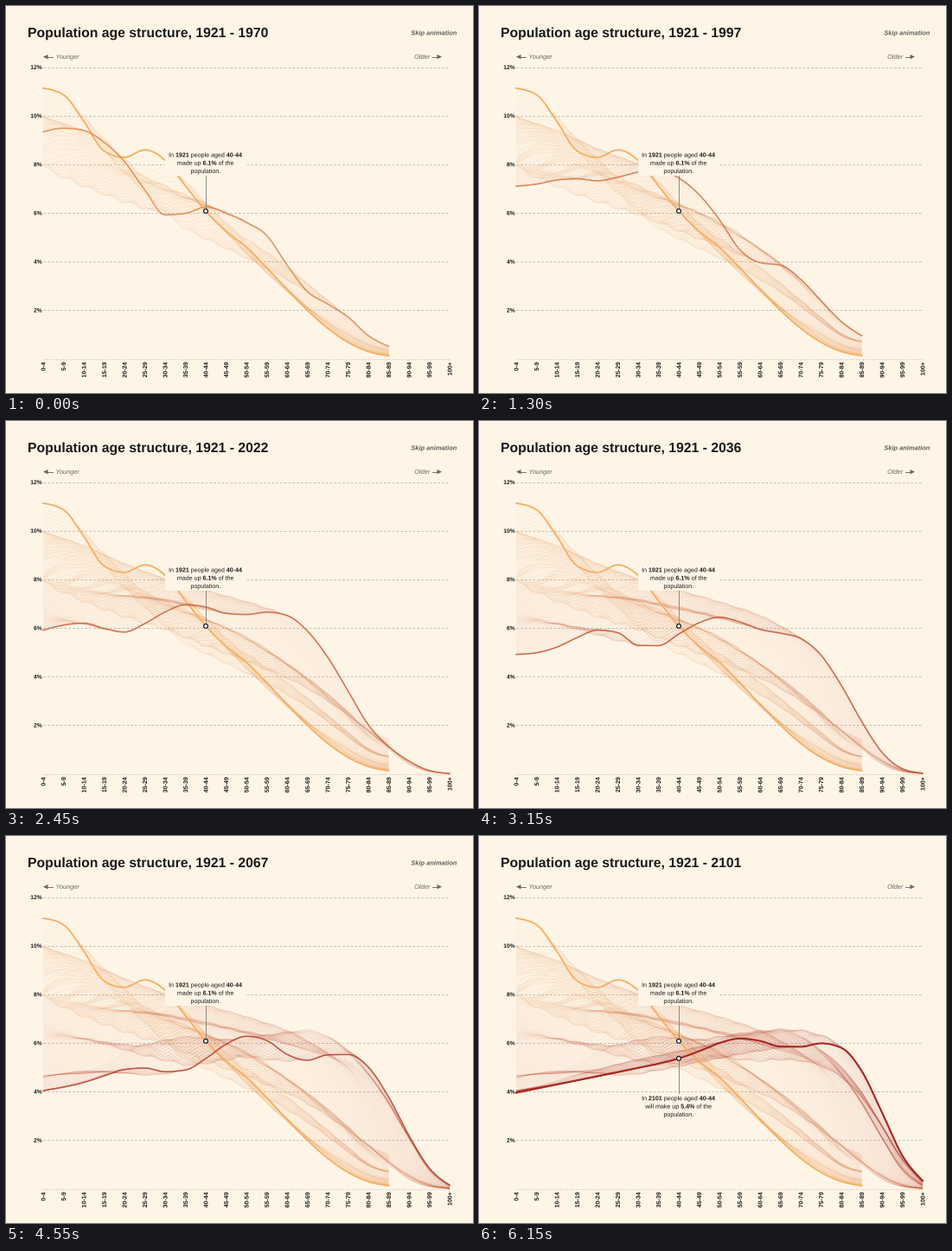
These frames come from a looping animation (540x447 px, 7.65 s). A matplotlib script:

```python
import numpy as np
import matplotlib.pyplot as plt
from matplotlib.animation import FuncAnimation
from matplotlib.collections import LineCollection
from matplotlib.patches import Circle, PathPatch, Polygon, Rectangle
from matplotlib.textpath import TextPath
from matplotlib.transforms import Affine2D

W, H, DPI = 540, 447, 72          # at 72 dpi one point is one pixel
BG, INK, GREY = "#fef5e7", "#1c1a18", "#6b6762"
X0, STEP, Y0, UNIT = 43, 23.5, 407.5, 28.08
FIRST, LAST, OPEN_END = 1921, 2101, 2012   # from OPEN_END on, ages run to 100+
MOVE, FRAMES, INTERVAL = 123, 153, 50
GROUP = 8                                  # ages 40-44
AGES = np.arange(21)

plt.rcParams.update({
    "mathtext.fontset": "custom",
    "mathtext.rm": "Liberation Sans",
    "mathtext.bf": "Liberation Sans:bold",
})

# Birth waves: centre year, spread in years, size in percent
WAVES = [(1878, 4, -.4), (1893, 4, .55), (1904.5, 4.5, -1.1), (1916, 3, .35),
         (1939.5, 5, -1.35), (1961, 9, 1.35), (1986, 7, .95), (2004, 4, -.4),
         (2017, 7, .95), (2034, 5, -.25), (2047, 7, .45)]
MIGRATION = 1975                           # later waves build up with age

ERAS = [1921, 1940, 2009, 2052, 2101]
SLOPE = [-.42, -.3, 0, .12, .17]           # change per age group
LIFE = [12.8, 13.4, 15.4, 17.5, 18.2]      # typical age group at death
SPREAD = [3.2, 3.05, 2.4, 1.7, 1.6]
BIRTHS = [(1921, 11.25), (1940, 9.2), (1970, 8.5), (1987, 7.6), (2009, 6.5),
          (2022, 5.85), (2040, 4.65), (2052, 4.5), (2062, 4.05), (2101, 3.95)]


def shares(year):
    """Percent per age group: level and birth waves, thinned by Gompertz survival."""
    slope, life, spread = (np.interp(year, ERAS, v) for v in (SLOPE, LIFE, SPREAD))
    born = year - 5 * AGES
    settled = np.where(born > MIGRATION, np.clip((AGES + .5) / 6, 0, 1), 1)
    wave = sum(size * np.exp(-((born - mid) / wide) ** 2 / 2) for mid, wide, size in WAVES)
    level = np.interp(year, *zip(*BIRTHS)) + slope * AGES + wave * settled
    return level * np.exp(-np.exp((AGES - life) / spread))


def smooth(v, n=7):
    """Monotone cubic through equally spaced values."""
    d = np.diff(v)
    s, t = d[:-1], d[1:]
    low = np.minimum(np.minimum(abs(s), abs(t)), abs(s + t) / 4)
    m = np.zeros(len(v))
    m[1:-1] = (np.sign(s) + np.sign(t)) * low
    m[0] = (3 * d[0] - m[1]) / 2
    m[-1] = (3 * d[-1] - m[-2]) / 2
    u = np.linspace(0, len(v) - 1, (len(v) - 1) * n + 1)
    i = np.minimum(u.astype(int), len(v) - 2)
    k = u - i
    y = (v[i] * (1 + 2 * k) * (1 - k) ** 2 + v[i + 1] * k * k * (3 - 2 * k)
         + m[i] * k * (1 - k) ** 2 + m[i + 1] * k * k * (k - 1))
    return u, y


def px(i):
    return X0 + STEP * i


def py(v):
    return Y0 - UNIT * v


def curve(year):
    v = shares(year)
    if year < OPEN_END:
        v = np.append(v[:17], v[17:].sum())
    u, y = smooth(v)
    return np.column_stack([px(u), py(y)])


def tint(year):
    f = (year - FIRST) / (LAST - FIRST)
    return (1 - f) * np.array([247, 174, 96]) / 255 + f * np.array([168, 38, 34]) / 255


years = np.arange(FIRST, LAST + 1)
curves = [curve(y) for y in years]
faint = [(*tint(y), .13) for y in years]

fig = plt.figure(figsize=(W / DPI, H / DPI), dpi=DPI, facecolor=BG)
ax = fig.add_axes([0, 0, 1, 1])
ax.set_xlim(0, W)
ax.set_ylim(H, 0)
ax.axis("off")


def outline(s, size, weight="normal", style="normal"):
    font = {"family": "Liberation Sans", "weight": weight, "style": style}
    return TextPath((0, 0), s, size=size, prop=font)


def label(x, y, s, size, align=0, turn=0, color=INK, **font):
    """Text as outlines, for sub-pixel spacing; align is 0 left to 1 right."""
    path = outline(s, size, **font)
    place = (Affine2D().translate(-align * path.get_extents().x1, 0)
             .scale(1, -1).rotate_deg(-turn).translate(x, y))
    return ax.add_patch(PathPatch(path, fc=color, lw=0, zorder=8,
                                  transform=place + ax.transData))


def arrow(tip, way):
    ax.plot([tip + 4 * way, tip + 11 * way], [58.7, 58.7], color=GREY, lw=.9)
    ax.add_patch(Polygon([(tip, 58.7), (tip + 5.5 * way, 56), (tip + 5.5 * way, 61.4)],
                         fc=GREY, lw=0))


def callout(year, top, verb):
    """Boxed note tied to one age group; returns its artists."""
    share = shares(year)[GROUP]
    x, y = px(GROUP), py(share)
    edge = top + 30 if top < y else top
    lines = [rf"In $\mathbf{{{year}}}$ people aged $\mathbf{{40}}$-$\mathbf{{44}}$",
             rf"{verb} up $\mathbf{{{share:.1f}\%}}$ of the", "population."]
    parts = [ax.add_patch(Rectangle((184, top), 93, 30, fc=BG, lw=0, zorder=6))]
    parts += ax.plot([x, x], [edge, y], color="#85807a", lw=.9, zorder=6)
    parts.append(ax.add_patch(Circle((x, y), 2.4, fc="white", ec=INK, lw=1.25, zorder=7)))
    for i, s in enumerate(lines):
        parts.append(label(x - .5, top + 8.7 + 9.3 * i, s, 7.1, align=.5))
    return parts


# Fixed parts
for pct in range(0, 13, 2):
    ax.plot([X0, px(20)], [py(pct)] * 2, color="#b9b2a7", lw=.8 if pct else .6,
            dashes=(3.2, 2.8), zorder=1)
    if pct:
        label(41.5, py(pct) + 2.4, f"{pct}%", 6.7, align=1, weight="bold")
for i in AGES:
    name = f"{5 * i}-{5 * i + 4}" if i < 20 else "100+"
    label(px(i) + 2.5, 411.5, name, 7, align=1, turn=90, weight="bold")
label(57.5, 61, "Younger", 7.3, style="italic", color=GREY)
label(490.5, 61, "Older", 7.4, align=1, style="italic", color=GREY)
arrow(43, 1)
arrow(504, -1)

# Moving parts
title = label(25, 36, "Population", 15.75, weight="bold")
skip = label(521, 33.5, "Skip animation", 7.45, align=1, color="#625e59",
             weight="bold", style="italic")
past = LineCollection([], linewidths=.8, zorder=2)
ax.add_collection(past)
ax.plot(*curves[0].T, color=tint(FIRST), lw=1.8, zorder=3)
now, = ax.plot([], [], zorder=4)
callout(FIRST, 165.7, "made")
ending = callout(LAST, 296.6, "will make")


def draw(n):
    year = round(float(np.interp(n, [0, 17, 36, 49, 78, 105, MOVE],
                                 [1970, 1987, 2009, 2022, 2052, 2083, LAST])))
    k = year - FIRST
    done = n >= MOVE
    title.set_path(outline(f"Population age structure, {FIRST} - {year}", 15.75, "bold"))
    past.set_segments(curves[1:k])
    past.set_color(faint[1:k])
    now.set_data(*curves[k].T)
    now.set_color(tint(year))
    now.set_linewidth(2.1 if done else 1.6)
    now.set_alpha(1 if done else .88)
    skip.set_visible(not done)
    for part in ending:
        part.set_visible(done)
    return [title, past, now, skip, *ending]


anim = FuncAnimation(fig, draw, frames=FRAMES, interval=INTERVAL,
                     init_func=lambda: draw(0), repeat=True, repeat_delay=0)
plt.show()
```
